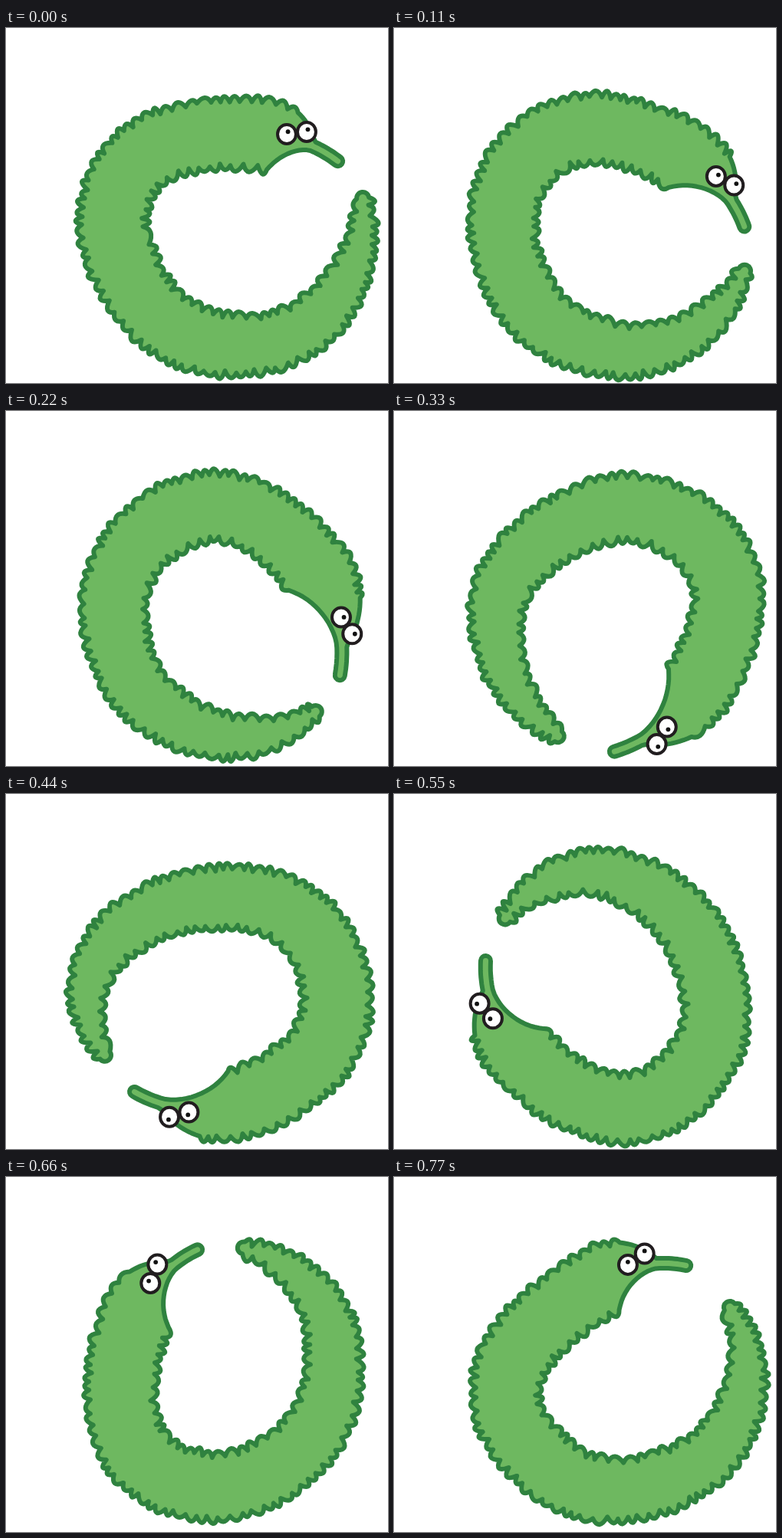
An HTML page for the animation above (880 ms loop, 498 by 463 pixels).

```html
<!DOCTYPE html>
<html lang="en">
<head>
<meta charset="utf-8">
<title>Fuzzy worm</title>
<style>
html, body { margin: 0; width: 100%; height: 100%; overflow: hidden; background: #fff; }
svg { display: block; width: 100%; height: 100%; }
#body { fill: #6eb860; stroke: #2f823f; stroke-width: 6; stroke-linejoin: round; }
.eye { fill: #fff; stroke: #211d1f; stroke-width: 4; }
.pupil { fill: #111; }
</style>
</head>
<body>
<svg viewBox="0 0 498 463">
  <path id="body"/>
  <ellipse class="eye" rx="12" ry="12.5"/><circle class="pupil" r="2.9"/>
  <ellipse class="eye" rx="12" ry="12.5"/><circle class="pupil" r="2.9"/>
</svg>
<script>
const STEP = 110, CENTER = [285, 265];
const TAIL = 8, SNOUT = 6.5, SNOUT_LENGTH = 45;

// A pose is a spine: tail tip, four points along the body, head, snout tip.
const spine = text => text.split(' ').map(p => p.split(',').map(Number));
const right = spine('464,214 402,382 235,401 141,270 185,163 343,140 438,178');
const lowRight = spine('410,387 283,424 165,350 152,205 272,124 405,208 434,351');
const bottom = spine('221,429 140,322 155,205 305,127 428,205 396,360 281,446');
const lowLeft = spine('134,347 115,225 225,143 378,160 428,300 303,404 162,385');
const topLeft = spine('302,91 418,182 400,335 274,404 162,345 170,180 256,92');
const topRight = spine('433,163 458,275 388,380 235,398 146,270 270,135 387,117');

const add = (p, d, k) => [p[0] + d[0] * k, p[1] + d[1] * k];
const dist = (a, b) => Math.hypot(b[0] - a[0], b[1] - a[1]);
const dirTo = (a, b) => [(b[0] - a[0]) / dist(a, b), (b[1] - a[1]) / dist(a, b)];
const fmt = p => p[0].toFixed(1) + ' ' + p[1].toFixed(1);

// Pose halfway round the ring between two others.
function between(a, b) {
  const angle = p => Math.atan2(p[1] - CENTER[1], p[0] - CENTER[0]);
  return a.map((p, i) => {
    const from = angle(p), diff = angle(b[i]) - from;
    const mid = from + Math.atan2(Math.sin(diff), Math.cos(diff)) / 2;
    const r = (dist(CENTER, p) + dist(CENTER, b[i])) / 2;
    return add(CENTER, [Math.cos(mid), Math.sin(mid)], r);
  });
}

function random(seed) {
  return () => (seed = seed * 16807 % 2147483647) / 2147483647;
}

// Smooth curve through the knots, addressed by distance from the first.
function curve(knots) {
  const last = knots.length - 1;
  const mirror = (chord, d) => chord.map((c, k) => {
    const dot = chord[0] * d[0] + chord[1] * d[1];
    return 2 * dot * c - d[k];
  });
  const dirs = knots.map((p, i) => i && i < last ? dirTo(knots[i - 1], knots[i + 1]) : null);
  dirs[0] = mirror(dirTo(knots[0], knots[1]), dirs[1]);
  dirs[last] = mirror(dirTo(knots[last - 1], knots[last]), dirs[last - 1]);

  const points = [knots[0]], lengths = [0], marks = [0];
  for (let i = 0; i < last; i++) {
    const a = knots[i], d = knots[i + 1], k = dist(a, d) / 3;
    const b = add(a, dirs[i], k), c = add(d, dirs[i + 1], -k);
    for (let n = 1; n <= 24; n++) {
      const t = n / 24, s = 1 - t;
      const p = [0, 1].map(j => s * s * s * a[j] + 3 * s * s * t * b[j]
        + 3 * s * t * t * c[j] + t * t * t * d[j]);
      lengths.push(lengths[lengths.length - 1] + dist(points[points.length - 1], p));
      points.push(p);
    }
    marks.push(lengths[lengths.length - 1]);
  }
  const total = marks[last];
  const at = s => {
    s = Math.max(0, Math.min(total, s));
    let i = 1;
    while (i < points.length - 1 && lengths[i] < s) i++;
    return add(points[i - 1], dirTo(points[i - 1], points[i]), s - lengths[i - 1]);
  };
  return { at, total, head: marks[last - 1] };
}

function worm(knots, seed) {
  const rnd = random(seed), { at, total, head } = curve(knots);
  const root = total - SNOUT_LENGTH, end = total - SNOUT;

  // Half width: grows from the tail, then narrows to the snout, domed above and hollow below.
  const half = (s, side) => {
    const full = TAIL + 37 * (1 - Math.exp(-(s - TAIL) / 160));
    const t = Math.max(0, Math.min(1, (s - head) / (root - head)));
    return SNOUT + (full - SNOUT) * (side > 0 ? 1 - t * t : (1 - t) ** 1.5);
  };
  const edge = (s, side, lift = 0) => {
    const d = dirTo(at(s - 5), at(s + 5));
    return add(at(s), [d[1], -d[0]], side * (half(s, side) + lift));
  };

  const smooth = (from, to, side) => {
    let path = '';
    for (let n = 0; n <= 20; n++) path += 'L' + fmt(edge(from + (to - from) * n / 20, side));
    return path;
  };
  // Pointed tufts of uneven width, height and lean.
  const fuzz = (from, to, side) => {
    const way = Math.sign(to - from);
    let path = '', s = from;
    while (s !== to) {
      const stretch = Math.max(0.4, dist(edge(s, side), edge(s + way * 8, side)) / 8);
      const step = way * (10 + rnd() * 9) / stretch;
      const done = (to - s - step) * way < 5;
      const next = done ? to : s + step;
      const tip = s + (next - s) * (0.3 + rnd() * 0.4);
      path += `Q${fmt(edge(tip, side, 8 + rnd() * 7))} ${fmt(edge(next, side, done ? 0 : -2 - rnd() * 4))}`;
      s = next;
    }
    return path;
  };

  const crown = head + (root - head) * 0.5;
  const cap = (r, p) => `A${r} ${r} 0 0 1 ${fmt(p)}`;
  const path = 'M' + fmt(edge(TAIL, 1)) + fuzz(TAIL, crown, 1) + smooth(crown, end, 1)
    + cap(SNOUT, edge(end, -1)) + smooth(end, head, -1) + fuzz(head, TAIL, -1)
    + cap(TAIL, edge(TAIL, 1)) + 'Z';

  // Eyes sit behind the snout and look outwards.
  const tip = at(total), facing = dirTo(at(total - 80), tip), out = [facing[1], -facing[0]];
  const eye = (back, up) => add(add(tip, facing, -back), out, up);
  const spots = [eye(82, 4), eye(60, 18)].flatMap(p => [p, add(p, out, 3.6)]);
  return { path, spots };
}

const frames = [right, between(right, lowRight), lowRight, bottom, lowLeft,
                between(lowLeft, topLeft), topLeft, topRight]
  .map((knots, i) => worm(knots, 4211 + i * 977));

const body = document.getElementById('body');
const parts = document.querySelectorAll('.eye, .pupil');

function draw(time) {
  const { path, spots } = frames[Math.floor(time / STEP) % frames.length];
  body.setAttribute('d', path);
  parts.forEach((part, n) => {
    part.setAttribute('cx', spots[n][0]);
    part.setAttribute('cy', spots[n][1]);
  });
}

const start = performance.now();
function tick() {
  draw(performance.now() - start);
  requestAnimationFrame(tick);
}
tick();
</script>
</body>
</html>
```
